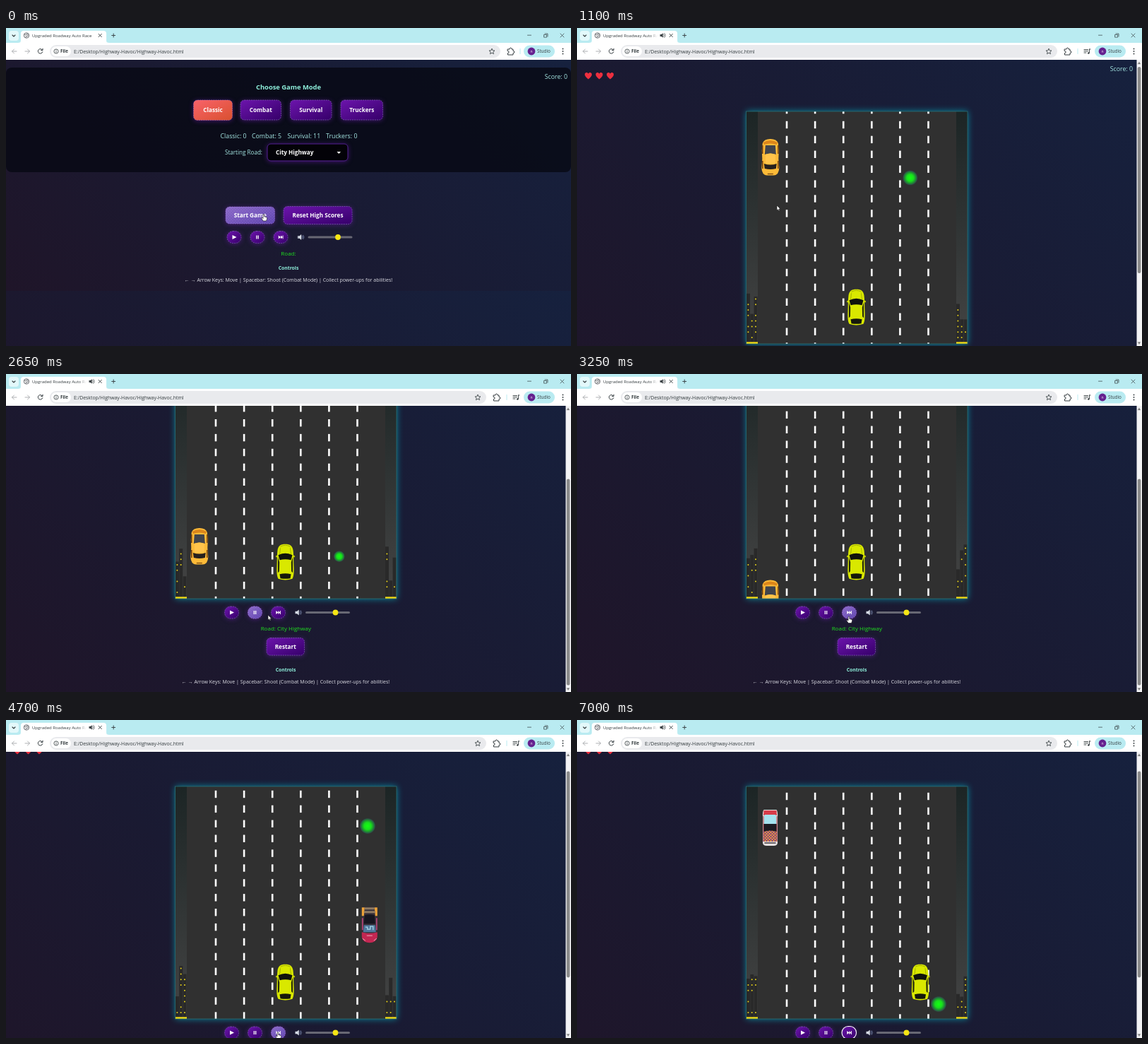
Write an HTML page that moves like this. It is 800 px wide and 450 px high and loops after 7050 ms.

```html
<!DOCTYPE html>
<html lang="en">
<head>
<meta charset="utf-8">
<title>Highway game</title>
<style>
html,body{margin:0;width:100%;height:100%;overflow:hidden;background:#1a1a2e}
#stage{position:relative;width:800px;height:450px;overflow:hidden}
#bg{position:absolute;left:0;top:45px;width:800px;height:534px;background:linear-gradient(45deg,#1f1529,#1a1a32 45%,#16213e)}
svg{position:absolute;left:0;top:0}
text{font-family:"Open Sans","Noto Sans",sans-serif;white-space:pre}
.b{font-weight:700}
.glow{filter:drop-shadow(0 1px 3px #6a1ab088)}
</style>
</head>
<body>
<div id="stage">
<div id="bg"></div>
<svg width="800" height="450" viewBox="0 0 800 450">
<defs>
  <linearGradient id="purple" x2="1" y2="1"><stop stop-color="#6c14ac"/><stop offset="1" stop-color="#36006a"/></linearGradient>
  <linearGradient id="red" x2="1" y2="1"><stop stop-color="#f9626a"/><stop offset="1" stop-color="#d9512f"/></linearGradient>
  <linearGradient id="hover" x2="1" y2="1"><stop stop-color="#8b68c8"/><stop offset="1" stop-color="#5e43b0"/></linearGradient>
  <linearGradient id="side" x2="0" y2="1"><stop stop-color="#1c2525"/><stop offset="1" stop-color="#444"/></linearGradient>
  <linearGradient id="fade"><stop stop-color="#fff" stop-opacity="0"/><stop offset="1" stop-color="#fff"/></linearGradient>
  <radialGradient id="orb"><stop stop-color="#12ff12"/><stop offset=".45" stop-color="#18e01c"/><stop offset=".75" stop-color="#1d9a34" stop-opacity=".85"/><stop offset=".9" stop-color="#2a6550" stop-opacity=".7"/><stop offset="1" stop-color="#2a6550" stop-opacity="0"/></radialGradient>
  <pattern id="dots" width="4" height="4" patternUnits="userSpaceOnUse"><circle cx="1" cy="1" r=".5" fill="#fff" opacity=".3"/><circle cx="3" cy="3" r=".5" fill="#fff" opacity=".3"/></pattern>
  <pattern id="check" width="4" height="4" patternUnits="userSpaceOnUse"><rect width="4" height="4" fill="#f0a035"/><path d="M0 0h2v2H0zM2 2h2v2H2z" fill="#7c3b86"/></pattern>
  <filter id="blur" x="-10%" y="-10%" width="120%" height="120%"><feGaussianBlur stdDeviation="5"/></filter>
  <clipPath id="board"><rect x="240" y="118" width="313" height="329"/></clipPath>

  <g id="heart"><path d="M0 5C-3 2.500-5 .7-5-1.700C-5-4.800-1.300-5.600 0-2.800C1.300-5.600 5-4.800 5-1.700C5 .7 3 2.500 0 5Z" fill="#ee2f3f"/></g>

  <g id="player">
    <path d="M-11-10l-2.500 1v2h2zM11-10l2.500 1v2h-2z" fill="#b9c400"/>
    <path d="M0-25.500C7-25.500 10-23 11-17C12-9 11.500-2 12 6C12.500 14 12 20 10 23.500Q0 27-10 23.500C-12 20-12.500 14-12 6C-11.500-2-12-9-11-17C-10-23-7-25.500 0-25.500Z" fill="#d9e800"/>
    <path d="M-7-22Q0-26 7-22M-7-20L-8-11M7-20L8-11" fill="none" stroke="#a5b000"/>
    <path d="M-10-10Q0-15 10-10L8-3Q0-5-8-3Z" fill="#10130c"/>
    <path d="M-10.500-7L-8.300 0L-8.600 13L-10.600 15ZM10.500-7L8.300 0L8.600 13L10.600 15Z" fill="#23280c"/>
    <path d="M-8 17Q0 15 8 17L7 23Q0 24-7 23Z" fill="#15180b"/>
  </g>

  <g id="amber">
    <path d="M0-26Q9-26 11-20L12-10L11.500 2L12.500 15Q12 25 5 25.500H-5Q-12 25-12.500 15L-11.500 2L-12-10L-11-20Q-9-26 0-26Z" fill="#fcba38"/>
    <path d="M-10-21Q0-27 10-21L9-18Q0-21-9-18Z" fill="#dc861a"/>
    <path d="M-11-17v12M11-17v12M-11 5v11M11 5v11" stroke="#75410e" stroke-width="1.500"/>
    <path d="M-7-17H7L8-4Q0-7-8-4Z" fill="#40444b"/>
    <path d="M-7-4Q0-7 7-4V9H-7Z" fill="#ffc44b"/>
    <path d="M-9 9Q0 12 9 9L8 16Q0 18-8 16Z" fill="#26211d"/>
    <path d="M-4 23.500H4" stroke="#7d4c12" stroke-width="1.300"/>
  </g>

  <g id="racer">
    <path d="M-9-25H9L11-16V17Q10 26 0 26Q-10 26-11 17V-16Z" fill="#373039"/>
    <path d="M-11-24H-7L-8-12H-11ZM11-24H7L8-12H11Z" fill="#eda237"/>
    <path d="M-7-24H7V-21H-7ZM-8-19H8V-16H-8Z" fill="#8d7a63"/>
    <path d="M-7-13Q0-15 7-13L8-1H-8Z" fill="#161620"/>
    <path d="M-10-9V8M10-9V8" stroke="#b04476" stroke-width="1.800"/>
    <path d="M-8 1H8L9 11H-9Z" fill="#4f789d"/>
    <path d="M-6 4h3v3h4V3h4v5" fill="none" stroke="#a9d6e6" stroke-width="1.300"/>
    <path d="M-11 11Q0 14 11 11V18Q9 26 0 26Q-9 26-11 18Z" fill="#c32752"/>
    <path d="M-10 20l4 3M10 20l-4 3M-4 16H4" stroke="#f0a8bb"/>
  </g>

  <g id="rally">
    <path d="M-9-25H9Q11-23 10.500-14V22Q10 26 5 26H-5Q-10 26-10.500 22V-14Q-11-23-9-25Z" fill="#e5dfdf"/>
    <path d="M-9-24H9L9.500-17H-9.500Z" fill="#d83c4a"/>
    <path d="M-8-18H8L9-5H-9Z" fill="#a5e2ee"/>
    <path d="M-9.500-5H9.500V7Q0 3-9.500 7Z" fill="#1c1b22"/>
    <path d="M-9.500 6Q0 3 9.500 6V20H-9.500Z" fill="url(#check)"/>
    <path d="M-9.500-16V20M9.500-16V20" stroke="#a33945"/>
    <path d="M-8 22H8" stroke="#6b6469" stroke-width="2"/>
  </g>
</defs>

<g id="menu"></g>
<g id="game"></g>
<g id="chrome"></g>
<g id="arrow"><path d="M0-3V4.200L1.700 2.700L2.800 5L4 4.400L2.900 2.200H5Z" fill="#fff" stroke="#111" stroke-width=".6"/></g>
<g id="hand"><path d="M-1-3.500Q0-4.500.8-3.500V-.5L4 .3Q5 1 4.500 3L3.500 5.500H-.8L-3.200 2Q-3.300.8-2 1L-1 2Z" fill="#fff" stroke="#111" stroke-width=".6"/></g>
</svg>
</div>
<script>
const LOOP = 7050, STEP = 50, START = 150;
const $ = id => document.getElementById(id);
const show = (el, on) => el.setAttribute('display', on ? 'inline' : 'none');
const move = (el, x, y) => el.setAttribute('transform', `translate(${x} ${y})`);

const text = (s, x, y, size, fill, anchor = 'middle', bold = '') =>
  `<text x="${x}" y="${y}" font-size="${size}" fill="${fill}" text-anchor="${anchor}" class="${bold}">${s}</text>`;
const rect = (x, y, w, h, fill, r = 0, more = '') =>
  `<rect x="${x}" y="${y}" width="${w}" height="${h}" rx="${r}" fill="${fill}" ${more}/>`;
const path = (d, stroke, w = 1, fill = 'none') =>
  `<path d="${d}" stroke="${stroke}" stroke-width="${w}" fill="${fill}" stroke-linecap="round" stroke-linejoin="round"/>`;
const circle = (x, y, r, fill, more = '') => `<circle cx="${x}" cy="${y}" r="${r}" fill="${fill}" ${more}/>`;

const dashed = 'stroke="#a98be0" stroke-opacity=".65" stroke-width=".7" stroke-dasharray="2 1.200"';
const AQUA = '#8ff0dc', PALE = '#a6e8e4', LIME = '#1fe01f';

function button(label, x, y, w, h, fill = 'url(#purple)') {
  return `<g class="glow">${rect(x, y, w, h, fill, 5.5, dashed)}</g>` +
    (fill === 'url(#hover)' ? rect(x, y, w, h, 'url(#dots)', 5.5) : '') +
    text(label, x + w / 2, y + h / 2 + 3, 8.2, '#fff', 'middle', 'b');
}

// Play, pause, skip and volume; (x, y) is the centre of the play button.
function player(x, y, id) {
  const icons = ['M-2.500-3L3.500 0L-2.500 3Z', 'M-1.800-2.500h1.300v5h-1.300zM.5-2.500h1.300v5H.5z', 'M-3.200-2.500L0 0L-3.200 2.500ZM0-2.500L2.700 0L0 2.500ZM2.600-2.500h.9v5h-.9z'];
  const keys = icons.map((d, i) => {
    const pill = (fill, more) => rect(-10, -8.5, 20, 17, fill, 8.5, more);
    return `<g transform="translate(${x + i * 33} ${y})"><g class="glow">${pill('url(#purple)', dashed)}</g>` +
      `<g id="${id}${i}" display="none">${pill('url(#hover)', dashed)}${pill('url(#dots)')}</g>` +
      `<path d="${d}" fill="#fff"/></g>`;
  }).join('');
  const vx = x + 94.500;
  return keys + path(`M${vx - 4} ${y - 1.500}h2l2.500-2v7l-2.500-2h-2z`, '#d5dbe4', .5, '#d5dbe4') +
    path(`M${vx + 2} ${y - 1.700}q1.500 1.700 0 3.400M${vx + 3.300} ${y - 2.800}q2.500 2.800 0 5.600`, '#8fa0c8', .7) +
    rect(x + 104.500, y - 1.600, 63, 3.200, '#686874', 1.600) + circle(x + 147, y, 3.900, '#f7e614');
}

function help(x, y) {
  return text('Controls', x, y, 6.8, AQUA, 'middle', 'b') +
    text('← → Arrow Keys: Move | Spacebar: Shoot (Combat Mode) | Collect power-ups for abilities!', x, y + 17, 7, '#dcdce4');
}

$('menu').innerHTML =
  rect(0, 56, 800, 148, '#080914', 8, 'opacity=".82"') +
  text('Score: 0', 795, 71.500, 8.8, PALE, 'end') +
  text('Choose Game Mode', 400, 86.500, 9.4, AQUA, 'middle', 'b') +
  button('Classic', 265.500, 102, 55, 28.500, 'url(#red)') + button('Combat', 332, 102, 57.500, 28) +
  button('Survival', 402.500, 102, 58.500, 28) + button('Truckers', 474, 102, 59.500, 28) +
  [['Classic: 0', 303.500], ['Combat: 5', 348], ['Survival: 11', 398.500], ['Truckers: 0', 453]]
    .map(([s, x]) => text(s, x, 155.500, 8.8, PALE, 'start')).join('') +
  text('Starting Road:', 310, 179, 8.1, PALE, 'start') +
  `<g class="glow">${rect(370, 164, 114, 24, '#030208', 5, 'stroke="#50208c"')}</g>` +
  text('City Highway', 382, 179, 8.2, '#fff', 'start', 'b') +
  '<path d="M468.500 175h5.500l-2.700 3z" fill="#fff"/>' +
  button('Start Game', 311, 253, 69.500, 24, 'url(#hover)') + button('Reset High Scores', 393, 252.500, 97, 25) +
  player(323, 296, 'm') + text('Road:', 400, 321.500, 8, LIME) + help(400, 341.500);

const sides = [240, 537];
$('game').innerHTML = '<g id="page">' +
  [16, 31.500, 47].map(x => `<use href="#heart" x="${x}" y="67.500"/>`).join('') +
  text('Score: 0', 787, 61, 8.8, PALE, 'end') +
  rect(240, 118, 313, 329, '#00d8e8', 0, 'opacity=".6" filter="url(#blur)"') +
  '<g clip-path="url(#board)">' + rect(240, 118, 313, 329, '#303030') +
  sides.map(x => rect(x, 118, 16, 329, 'url(#side)')).join('') +
  '<g id="dashes"></g><g id="city"></g>' +
  sides.map(x => rect(x, 444.300, 16, 2.700, '#f2dc14')).join('') +
  '<g id="movers"></g><use id="me" href="#player"/></g>' +
  rect(239.500, 118, 313.500, 329, 'none', 0, 'stroke="#2a6c70" stroke-width=".8"') +
  player(319.500, 466.500, 'g') +
  rect(375, 457.500, 20.500, 18, 'none', 9, 'id="focus" stroke="#fff" stroke-width="1.100"') +
  text('Road: City Highway', 396.300, 492, 8, LIME) + button('Restart', 369, 502.500, 53.500, 24.500) +
  help(396, 550) + '</g>' +
  rect(792.500, 45, 7.500, 405, '#f3f3f5') + path('M796 48l1.800 3h-3.600zM796 447.500l1.800-3h-3.600z', '#777', .3, '#777') +
  rect(793.800, 55, 4.600, 292, '#898989', 2.300, 'id="thumb"');

let lanes = '';
for (let y = -42; y < 350; y += 20.9)
  for (let i = 0; i < 6; i++) lanes += rect(295.700 + i * 40.100, 118 + y, 2.600, 10.400, '#fff');
$('dashes').innerHTML = lanes;

const INK = '#333b3e', DIM = '#a5a8ab';
const bar = (right) => rect(62, 24, right - 62, 18, '#e9eaed', 9) +
  `<path transform="translate(${right - 12} 33)" d="M0-4L1.100-1.200L4-1L1.800.9L2.500 3.700L0 2.200L-2.500 3.700L-1.800.9L-4-1L-1.100-1.200Z" fill="none" stroke="${INK}" stroke-width=".8"/>` +
  path(`M${right + 10.500} 30h2.500q0-2 1.500-2t1.500 2h2v2.500q2 0 2 1.500t-2 1.500v2.500h-7.500v-2.500q1.600 0 1.600-1.500t-1.600-1.500z`, INK, 1);
$('chrome').innerHTML =
  rect(0, 0, 800, 22, '#b9ebf1') + rect(0, 21, 800, 24, '#fff') +
  rect(4, 4, 14, 14, '#e3f8fa', 4) + path('M9 10l2 2l2-2', INK, 1.100) +
  path('M18 21q3 0 3-3V8q0-4 4-4H138q4 0 4 4V18q0 3 3 3Z', '#fff', .2, '#fff') +
  circle(29, 10.500, 3.700, '#f3f3f3', `stroke="#5f6368" stroke-width=".9"`) + path('M26 9q2 2 3 0t2.500 1M28 13q0-2 3-2', '#5f6368', .9) +
  text('Upgraded Roadway Auto Race', 37, 13, 6, INK, 'start') +
  '<g id="sound">' + rect(103, 5, 11, 14, 'url(#fade)') + rect(114, 5, 24, 14, '#fff') +
  path('M118 9.300h1.600l1.700-1.500v5.400l-1.700-1.500H118z', INK, .5, INK) + path('M122.500 8.500q2 2 0 4M123.800 7.500q2.800 3 0 6', INK, .7) + '</g>' +
  path('M131 8.300l4.400 4.400M135.400 8.300L131 12.700M149.700 10.500h5M152.200 8v5', INK, .9) +
  path('M738.500 10.200h5M785 8l5 5M790 8l-5 5M762 9.500h3.600v3.600H762zM763 8h4v4', INK, .7) +
  path('M15 33H8.500M11.500 30l-3 3l3 3M27 33h6.500M30.500 30l3 3l-3 3', DIM, .9) +
  path('M51.500 31.200a3.300 3.300 0 1 0 .3 2.600M52 29.200v2.300h-2.300', INK, 1) +
  `<g id="wide">${bar(700)}</g><g id="narrow">${bar(680)}` +
  path('M718 30.500h5.500M718 32.700h5.500M718 35h3M725.500 30v5M725.500 30h1.500', INK, .9) + circle(724.300, 35.500, 1.300, INK) + '</g>' +
  path('', INK).replace('<path', '<path id="split"').replace(INK, '#b9ebf1') +
  rect(64, 26, 28, 14, '#fff', 7) + circle(71, 33, 3.100, 'none', `stroke="${INK}" stroke-width=".8"`) + path('M71 32.800v1.700M71 31.300v.1', INK, .8) +
  text('File', 77, 35.300, 6.2, INK, 'start', 'b') +
  text('E:/Desktop/Highway-Havoc/Highway-Havoc.html', 96, 35.500, 6.9, INK, 'start') +
  rect(733, 24.500, 44, 17, '#b9ebf1', 8.500) + circle(744, 33, 5.400, '#65208f') + text('n', 744, 35, 5, '#fff') +
  text('Studio', 752, 35.300, 6.3, INK, 'start') +
  [29.500, 33, 36.500].map(y => circle(788.500, y, .9, INK)).join('');

// Tables of [time, ...values], read with straight lines between entries.
const scrollAt = [[1700, 0], [2200, 129], [3600, 129], [3800, 40], [3900, 24]];
const dashAt = [[150, -142], [1100, 14], [2650, 263.3], [3800, 441.900], [4700, 591.200], [5850, 779.300], [7000, 970.400]];
const meAt = [[6350, 395.500], [6930, 486]];
const cursorAt = [[150, 365, 267.500], [800, 283, 254], [1700, 283, 254], [2300, 335, 338], [2650, 371, 344],
  [2800, 385, 347], [3900, 385, 347], [4400, 385, 446], [4900, 385, 446], [5150, 385, 470]];
// href, x, time, y below the road's top, pixels per ms
const traffic = [['amber', 273.800, 1100, 65, .1226], ['racer', 514.800, 3800, 53, .158], ['rally', 273.500, 7000, 58, .14]];
const orbs = [[471.800, 1100, 94, .113], [512, 4700, 56, .1096]];

function at(table, t) {
  if (t <= table[0][0]) return table[0].slice(1);
  for (let i = 1; i < table.length; i++) {
    const a = table[i - 1], b = table[i];
    if (t <= b[0]) return a.slice(1).map((v, k) => v + (b[k + 1] - v) * (t - a[0]) / (b[0] - a[0]));
  }
  return table[table.length - 1].slice(1);
}
const within = (t, a, b) => t >= a && t < b;
const noise = n => { const s = Math.sin(n * 12.9898) * 43758.5453; return s - Math.floor(s); };

// Roadside towers get new heights and lit windows at every step.
function city(step) {
  let out = '';
  sides.forEach((x0, s) => {
    for (let i = 0; i < 3; i++) {
      const seed = step * 61 + s * 29 + i * 9.7;
      const h = 22 + 56 * noise(seed), x = x0 + i * 5.3;
      out += rect(x, 447 - h, 4.900, h, '#292929');
      for (let j = 0; j * 7.800 + 12 < h; j++)
        if (noise(seed + j * 3.1 + 1) > .5) out += circle(x + 2.400, 438 - j * 7.800, 1, '#e9d41c');
    }
  });
  return out;
}

function draw(t) {
  const playing = t >= START;
  show($('menu'), !playing);
  show($('game'), playing);
  show($('sound'), playing);
  show($('narrow'), playing);
  show($('wide'), !playing);
  $('split').setAttribute('d', playing ? 'M709 29.500v7' : 'M728 29.500v7');

  const scroll = playing ? at(scrollAt, t)[0] : 0;
  $('bg').style.transform = `translateY(${-scroll}px)`;
  $('bg').style.backgroundSize = playing ? '100% 534px' : '100% 327px';
  move($('page'), 0, -scroll);
  $('thumb').setAttribute('y', 55 + scroll * .725);

  move($('dashes'), 0, (at(dashAt, t)[0] + 209) % 20.9);
  $('city').innerHTML = city(t / STEP);
  move($('me'), at(meAt, t)[0], 395.300);
  const r = 9.800 + 1.800 * Math.sin(2 * Math.PI * (t / 575 + .176));
  $('movers').innerHTML =
    orbs.map(([x, t0, y, v]) => circle(x, 118 + y + (t - t0) * v, r, 'url(#orb)')).join('') +
    traffic.map(([id, x, t0, y, v]) => `<use href="#${id}" x="${x}" y="${118 + y + (t - t0) * v}"/>`).join('');

  show($('g1'), within(t, 2450, 2700));
  show($('g2'), within(t, 2750, 3900) || within(t, 4400, 4950));
  show($('focus'), t >= 6350);

  const [x, y] = at(cursorAt, t);
  const pointing = !playing || within(t, 2750, 3900) || within(t, 4400, 4950);
  move($('hand'), x, y);
  move($('arrow'), x, y);
  show($('hand'), pointing);
  show($('arrow'), !pointing);
}

const begin = performance.now();
function tick() {
  const t = (performance.now() - begin) % LOOP;
  draw(Math.floor(t / STEP) * STEP);
  requestAnimationFrame(tick);
}
tick();
</script>
</body>
</html>
```
